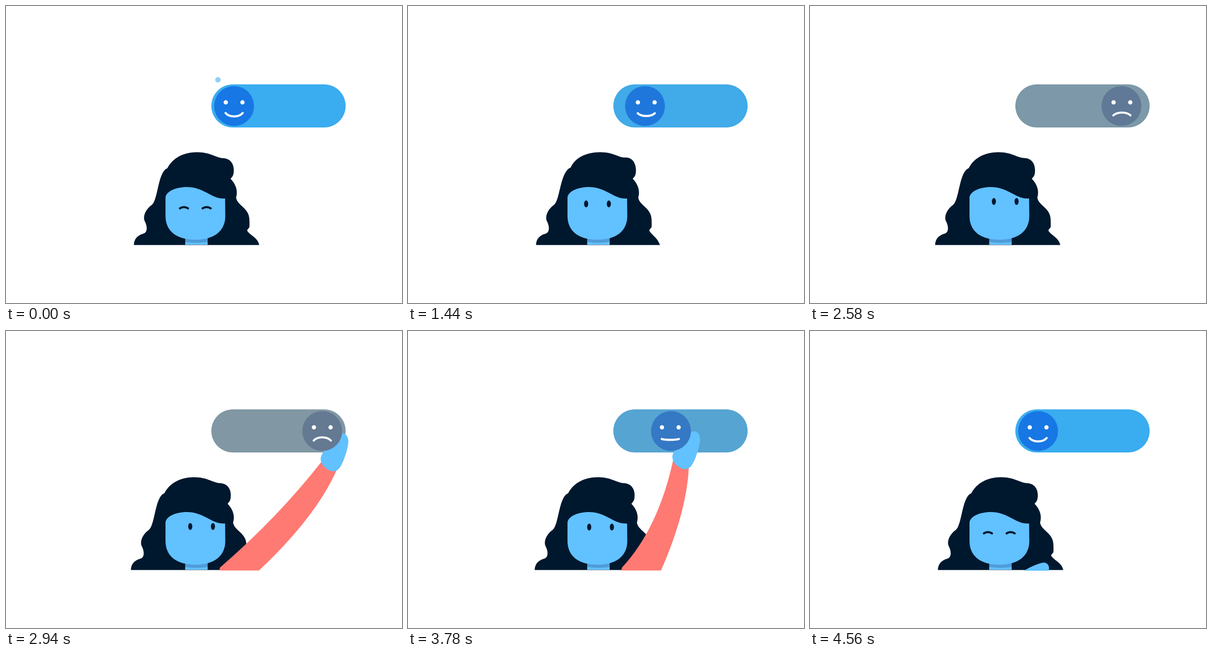
An HTML page with a canvas that plays this animation: 864x648 px, repeating every 4.59 s.

```html
<!DOCTYPE html>
<html lang="en">
<head>
<meta charset="utf-8">
<title>Mood slider</title>
<style>
  html, body { margin: 0; width: 100%; height: 100%; overflow: hidden; background: #fff; }
  canvas { display: block; width: 864px; height: 648px; }
</style>
</head>
<body>
<canvas id="stage" width="864" height="648"></canvas>
<script>
const ctx = document.getElementById('stage').getContext('2d');
const LOOP = 4590, TAU = Math.PI * 2, DEG = Math.PI / 180;
const SKIN = '#62c1ff', HAIR = '#00182e', SLEEVE = '#ff7a73';

// The mood sours from SOUR on, and is pushed back from PUSH on.
const SOUR = 1305, PUSH = 2965, SLIDE = 1350;

const lerp = (a, b, k) => a + (b - a) * k;
const mix = (a, b, k) => a.map((v, i) => lerp(v, b[i], k));
const rgb = c => `rgb(${c.map(Math.round)})`;
const ramp = (t, from, span) => Math.min(1, Math.max(0, (t - from) / span));
const pulse = (t, from, to, edge) => ramp(t, from, edge) - ramp(t, to - edge, edge);

function fill(path, color) {
  ctx.fillStyle = color;
  ctx.fill(path);
}

function oval(x, y, rx, ry, color) {
  ctx.fillStyle = color;
  ctx.beginPath();
  ctx.ellipse(x, y, rx, ry, 0, 0, TAU);
  ctx.fill();
}

function line(d, color) {
  ctx.strokeStyle = color;
  ctx.lineWidth = 4.6;
  ctx.lineCap = 'round';
  ctx.stroke(new Path2D(d));
}

const face = new Path2D(`M348 418C349 404 372 395 394 395C432 395 447 420 474 420
  H478L478.5 458C478.5 491 454 510 413.5 510C372 510 348 491 348 458Z`);
const neck = new Path2D('M391 500H440V521H391Z');
const neckShade = new Path2D('M391 507H440V515Q415.5 518.5 391 515Z');
const hand = new Path2D(`M44 1C56 -2 62 10 60 24S51 58 46 68S35 84 26 83
  S0 71 0 56S32 6 44 1Z`);

// Sway lifts the crown and tucks in the right tip.
const hairPath = sway => new Path2D(`M279 521.5C279 508 288 500 299 497
  S308 480 303 470S304 444 318 434S331 362 ${352 + 2.5 * sway} ${354 - 1.5 * sway}
  C364 331 388 319 ${417 + 2 * sway} 319S457 331 474 ${332 - 1.5 * sway}
  S497 346 497 358S494 372 490 377C500 387 507 402 502 418
  C505 436 530 440 531 465S531 480 526 490
  C533 501 ${550 - 6 * sway} 506 ${552.5 - 3 * sway} 521.5Z`);

// Dots burst from behind the knob, one after another.
function drawBurst(t) {
  ctx.globalAlpha = .56;
  for (let i = 0; i < 4; i++) {
    const k = (t - 90 * i) / 800;
    if (k < 0 || k >= 1) continue;
    const angle = (30 * i - 122) * DEG;
    const dist = lerp(67, 117, 1 - (1 - k) ** 4);
    const r = 6 * Math.min(1, 2 * (1 - k));
    oval(498 + dist * Math.cos(angle), 218 + dist * Math.sin(angle), r, r, '#3aacf0');
  }
  ctx.globalAlpha = 1;
}

function drawEyes(t, p) {
  const open = pulse(t, 1200, 4410, 80);
  const x = lerp(387.2 + 3.8 * ramp(t, SOUR + SLIDE, 300), 402, p);
  const y = 433 - 6.5 * ramp(t, SOUR, 700) + 2 * ramp(t, PUSH, SLIDE);
  for (const dx of [0, 49.5]) {
    if (open > .15) oval(x + dx, y, 4.5, 7.5 * open, HAIR);
    else line(`M${379.5 + dx} 441.5q8.7 -5.5 17.5 0`, HAIR);
  }
}

function drawWoman(t, p) {
  const sway = ramp(t, 0, 1300) - ramp(t, 2130, 525);
  ctx.save();
  ctx.translate(sway - 6.5 * p, 0);
  fill(hairPath(sway), HAIR);
  ctx.restore();
  fill(neck, SKIN);
  fill(neckShade, '#4f9cd8');
  fill(face, SKIN);
  drawEyes(t, p);
}

function drawArm(t, p) {
  const down = 1 - pulse(t, 2600, 4575, 250);
  if (down === 1) return;
  const r = down * down, base = 522.5 + 12 * r;
  // Point that follows the knob, and sinks out of view with the arm.
  const follow = (left, right, rest) => mix(mix(left, right, p), rest, r);
  const [x, y] = follow([505, 215.5], [686.5, 223], [446, 530]);

  ctx.save();
  ctx.beginPath();
  ctx.rect(0, 0, 864, 523);
  ctx.clip();
  ctx.fillStyle = SLEEVE;
  ctx.beginPath();
  ctx.moveTo(465, base);
  ctx.lineTo(467, base - 6.5);
  ctx.quadraticCurveTo(...follow([515, 446], [594, 406], [467, 575]), x + 2, y + 62);
  ctx.lineTo(x + 36, y + 78);
  ctx.quadraticCurveTo(...follow([563, 388], [677, 405], [552, 575]), 552, base);
  ctx.fill();

  ctx.translate(x + 30, y + 42);
  ctx.rotate(25 * r * DEG);
  ctx.translate(-30, -42);
  fill(hand, SKIN);
  ctx.restore();
}

function drawPill(p) {
  ctx.fillStyle = rgb(mix([58, 172, 240], [129, 151, 164], p));
  ctx.beginPath();
  ctx.roundRect(448, 171, 293, 94, 47);
  ctx.fill();
}

function drawKnob(t, p) {
  const x = lerp(497.7, 690, p);
  const look = 2.75 * pulse(t, 1200, SOUR + SLIDE, 180) - 1.5 * pulse(t, PUSH, PUSH + SLIDE, 100);
  oval(x, 218.3, 43.5, 43.5, rgb(mix([23, 119, 228], [100, 121, 146], p)));
  for (const dx of [-18.2, 18.2]) oval(x + look + dx, 210.3, 4.7, 4.7, '#fff');
  const bend = lerp(9.9, -9.3, p);
  line(`M${x + look - 18.7} ${lerp(233.5, 239, p)}c8.7 ${bend} 28.7 ${bend} 37.4 0`, '#fff');
}

function draw(t) {
  const p = ramp(t, SOUR, SLIDE) - ramp(t, PUSH, SLIDE);
  ctx.fillStyle = '#fff';
  ctx.fillRect(0, 0, 864, 648);
  drawBurst(t);
  drawPill(p);
  drawWoman(t, p);
  drawArm(t, p);
  drawKnob(t, p);
}

const start = performance.now();
function tick() {
  draw((performance.now() - start) % LOOP);
  requestAnimationFrame(tick);
}
tick();
</script>
</body>
</html>
```
